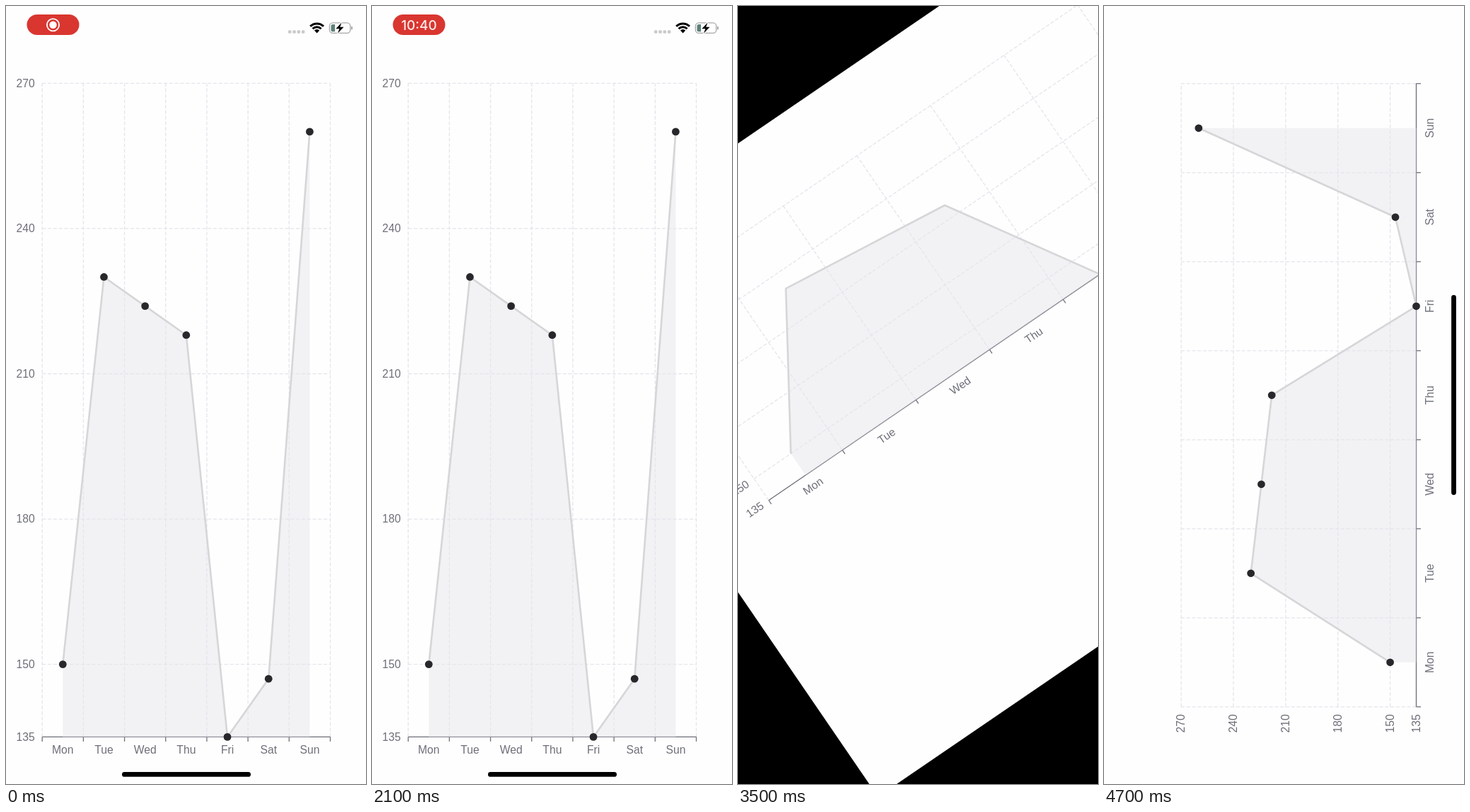
Recreate the animation shown at these times as an HTML page with a canvas. Size 509 by 1101 pixels, loop 5 s.

```html
<!DOCTYPE html>
<html lang="en">
<head>
<meta charset="utf-8">
<title>Rotating chart</title>
<style>
  html, body { margin: 0; width: 100%; height: 100%; overflow: hidden; background: #000; }
  canvas { display: block; width: 509px; height: 1101px; }
</style>
</head>
<body>
<canvas id="stage" width="509" height="1101"></canvas>
<script>
const W = 509, H = 1101, LOOP = 5000, STEP = 100;
const ctx = document.getElementById('stage').getContext('2d');

const days = ['Mon', 'Tue', 'Wed', 'Thu', 'Fri', 'Sat', 'Sun'];
const values = [150, 230, 224, 218, 135, 147, 260];
const levels = [135, 150, 180, 210, 240, 270];
const portrait = { left: 51.2, right: 458.5, top: 109.4, bottom: 1034.4 };
const landscape = { left: 109.2, right: 991.2, top: 109.2, bottom: 441.5 };

const ROTATE_START = 3348.4, ROTATE_TIME = 357.6;
const DOTS_START = 3473, DOTS_TIME = 1000, DOT_GROW = 200;

const clamp = x => Math.max(0, Math.min(1, x));
const mix = (a, b, k) => a + (b - a) * k;
const easeInOut = k => (1 - Math.cos(Math.PI * k)) / 2;
const easeOut = k => 1 - (1 - k) ** 3;

function line(x1, y1, x2, y2) {
  ctx.beginPath();
  ctx.moveTo(x1, y1);
  ctx.lineTo(x2, y2);
  ctx.stroke();
}

function disc(x, y, r, color) {
  ctx.fillStyle = color;
  ctx.beginPath();
  ctx.arc(x, y, r, 0, 2 * Math.PI);
  ctx.fill();
}

function roundBox(x, y, w, h, r) {
  ctx.beginPath();
  ctx.roundRect(x, y, w, h, r);
}

function fillBox(x, y, w, h, r, color) {
  ctx.fillStyle = color;
  roundBox(x, y, w, h, r);
  ctx.fill();
}

// dotScale(position) gives the size of a dot at 0..1 along the x axis
function drawChart(box, dotScale) {
  const { left, right, top, bottom } = box;
  const band = (right - left) / days.length;
  const yOf = v => bottom - (v - 135) / 135 * (bottom - top);
  const points = values.map((v, i) => [left + band * (i + 0.5), yOf(v)]);

  ctx.lineWidth = 1.3;
  ctx.strokeStyle = '#e4e5ec';
  ctx.setLineDash([5.2, 2.6]);
  for (let i = 0; i <= days.length; i++) line(left + band * i, bottom, left + band * i, top);
  for (const v of levels) line(left, yOf(v), right, yOf(v));
  ctx.setLineDash([]);

  ctx.strokeStyle = '#6e7079';
  line(left, bottom, right, bottom);
  for (let i = 0; i <= days.length; i++) line(left + band * i, bottom, left + band * i, bottom + 6.5);

  ctx.fillStyle = '#6e7079';
  ctx.font = '15.7px "Liberation Sans", Arial, sans-serif';
  ctx.textAlign = 'right';
  for (const v of levels) ctx.fillText(v, left - 10.6, yOf(v) + 5.2);
  ctx.textAlign = 'center';
  days.forEach((day, i) => ctx.fillText(day, points[i][0], bottom + 24));

  ctx.beginPath();
  for (const p of points) ctx.lineTo(...p);
  ctx.lineTo(points[6][0], bottom);
  ctx.lineTo(points[0][0], bottom);
  ctx.fillStyle = 'rgba(232,229,235,.5)';
  ctx.fill();

  ctx.beginPath();
  for (const p of points) ctx.lineTo(...p);
  ctx.strokeStyle = '#d6d6d9';
  ctx.lineWidth = 2.6;
  ctx.lineJoin = 'bevel';
  ctx.stroke();

  points.forEach(([x, y], i) => disc(x, y, 5.4 * dotScale((i + 0.5) / days.length), '#28282c'));
}

function drawPill(t) {
  const glow = clamp(0.5 - 0.9 * Math.cos(2 * Math.PI * t / 2050));
  const clock = clamp((t - 400) / 300);
  fillBox(29.5, 12, 74, 29, 14.5,
    `rgb(${mix(217, 255, glow)},${mix(54, 59, glow)},${mix(48, 48, glow)})`);

  ctx.globalAlpha = 1 - clock;
  disc(66.5, 26.7, 5.2, '#fff');
  ctx.strokeStyle = '#fff';
  ctx.lineWidth = 1.8;
  ctx.beginPath();
  ctx.arc(66.5, 26.7, 8.6, 0, 2 * Math.PI);
  ctx.stroke();

  ctx.globalAlpha = clock * mix(0.9, 1, glow);
  ctx.fillStyle = '#fff';
  ctx.font = '500 19px Inter, sans-serif';
  ctx.textAlign = 'center';
  ctx.fillText('10:40', 66.5, 33.6);
  ctx.globalAlpha = 1;
}

function drawStatusIcons() {
  for (let i = 0; i < 4; i++) fillBox(399 + i * 6.3, 34.3, 4.5, 4.5, 1.5, '#cacaca');

  // wifi: two arcs over a wedge
  const from = -Math.PI * 0.75, to = -Math.PI * 0.25;
  ctx.strokeStyle = ctx.fillStyle = '#000';
  ctx.lineWidth = 3;
  for (const r of [13.3, 8.5]) {
    ctx.beginPath();
    ctx.arc(439.6, 38.2, r, from, to);
    ctx.stroke();
  }
  ctx.beginPath();
  ctx.moveTo(439.6, 38.6);
  ctx.arc(439.6, 38.2, 5.2, from, to);
  ctx.fill();

  ctx.strokeStyle = '#a8a8a8';
  ctx.lineWidth = 1.3;
  roundBox(457.4, 23.8, 29.4, 14.6, 4.6);
  ctx.stroke();
  fillBox(488, 28.7, 1.9, 4.8, 1, '#a8a8a8');
  fillBox(459.5, 25.9, 5.6, 10.4, [2.6, 0, 0, 2.6], '#5d8077');

  // charging bolt
  ctx.beginPath();
  for (const [x, y] of [[474.5, 23.5], [466.3, 32.2], [471.3, 32.2], [469, 38.8], [477.5, 29.7], [472.3, 29.7]]) ctx.lineTo(x, y);
  ctx.closePath();
  ctx.strokeStyle = '#fefefe';
  ctx.lineWidth = 2.4;
  ctx.stroke();
  ctx.fillStyle = '#000';
  ctx.fill();
}

function drawPortrait(t) {
  fillBox(0, 0, W, H, 0, '#fefefe');
  drawPill(t);
  drawStatusIcons();
  drawChart(portrait, () => 1);
  fillBox(164, 1084, 182, 6.8, 3.4, '#000');
}

// The view turns about the stage centre while its bounds swap;
// its page is already full landscape width and stays at the top left.
function drawLandscape(t) {
  const turn = easeInOut(clamp((t - ROTATE_START) / ROTATE_TIME));
  const w = mix(W, H, turn), h = mix(H, W, turn);
  fillBox(0, 0, W, H, 0, '#000');
  ctx.save();
  ctx.translate(W / 2, H / 2);
  ctx.rotate(-turn * Math.PI / 2);
  ctx.translate(-w / 2, -h / 2);
  fillBox(0, 0, H, h, 0, '#fefefe');
  drawChart(landscape, at => easeOut(clamp((t - DOTS_START - at * DOTS_TIME) / DOT_GROW)));
  ctx.globalAlpha = clamp((t - 4250) / 200);
  fillBox(409, 491.1, 283, 6.8, 3.4, '#000');
  ctx.restore();
}

function frame() {
  const t = Math.floor(performance.now() % LOOP / STEP) * STEP;
  (t < ROTATE_START ? drawPortrait : drawLandscape)(t);
  requestAnimationFrame(frame);
}
frame();
</script>
</body>
</html>
```
